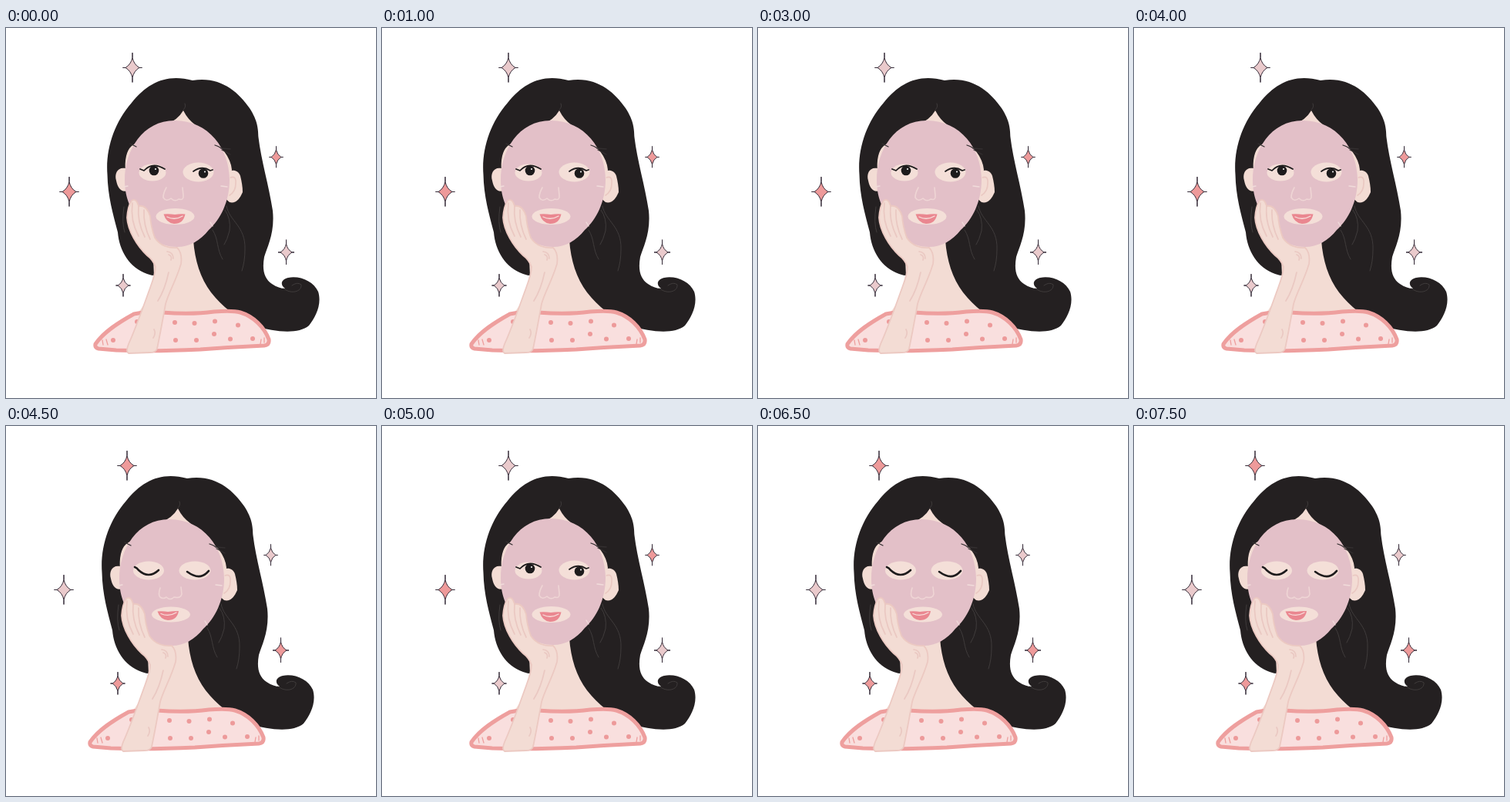
Animation of 480 by 480 pixels, one loop 8000 ms. Source, as an HTML page:

```html
<!DOCTYPE html>
<html lang="en">
<head>
<meta charset="utf-8">
<title>Face mask</title>
<style>
  html, body { margin: 0; width: 100%; height: 100%; overflow: hidden; background: #fff; }
  svg { display: block; width: 100vw; height: 100vh; }
  path { stroke-linecap: round; stroke-linejoin: round; }

  /* Two held poses, half a second each */
  .figure { animation: sway 1s step-end infinite; }
  .open { animation: first 1s step-end infinite; }
  .closed { animation: second 1s step-end infinite; }
  .pale { animation: to-coral 1s step-end infinite; }
  .coral { animation: to-pale 1s step-end infinite; }
  .face { animation: nod 1s step-end infinite; }
  @keyframes sway { 0% { transform: none; } 50% { transform: translate(-7px, 0); } }
  @keyframes nod { 0% { transform: none; } 50% { transform: translate(0, 1px); } }
  @keyframes first { 0% { visibility: visible; } 50% { visibility: hidden; } }
  @keyframes second { 0% { visibility: hidden; } 50% { visibility: visible; } }
  @keyframes to-coral { 0% { fill: #eacacc; } 50% { fill: #ee9a9a; } }
  @keyframes to-pale { 0% { fill: #ee9a9a; } 50% { fill: #eacacc; } }

  .hair { fill: #242021; }
  .skin { fill: #f3dcd4; }
  .arm { stroke: #ecc9c2; stroke-width: 1.8; }
  .mask { fill: #e3c0c8; }
  .hole { fill: #f4dfd8; }
  .dress { fill: #f9dfde; stroke: #ee9f9e; stroke-width: 5; }
  .dots { fill: #ed9a9a; }
  .lips { fill: #ea8790; }
  .ink { fill: #1d1b1c; }
  .line { fill: none; stroke-width: 1.3; }
  .crease { stroke: #eac8c2; stroke-width: 1.7; }
  .strand { stroke: #403c3c; stroke-width: 1; }
  .lash { stroke: #1d1b1c; stroke-width: 1.8; }
  .closed .lash { stroke-width: 2.6; }
  .nose { stroke: #efd5d5; stroke-width: 1.6; }
  .star { stroke: #332936; stroke-width: 1; }
</style>
</head>
<body>
<svg viewBox="0 0 480 480">
  <defs>
    <path id="star" vector-effect="non-scaling-stroke"
      d="M0-19V-13Q2-4 9 0H12.500H9Q2 4 0 13V19V13Q-2 4-9 0H-12.500H-9Q-2-4 0-13Z"/>
  </defs>
  <g class="figure">
    <g class="star">
      <use class="pale" href="#star" x="164" y="51.500"/>
      <use class="coral" href="#star" x="82" y="212.500"/>
      <g transform="translate(350.5 167.500) scale(.72)"><use class="coral" href="#star"/></g>
      <g transform="translate(363.5 291) scale(.84)"><use class="pale" href="#star"/></g>
      <g transform="translate(152 334) scale(.76)"><use class="pale" href="#star"/></g>
    </g>

    <path class="hair" d="M131.500 190C129 158 140 123 163 97C184 71 208 59 242 68
      C277 62 301 82 316 104C327 121 327 131 327.500 142C331 172 341 204 346 237
      C349 265 339 284 335 297C332 314 335 325 345 332C351 336 357 338 362 338
      C355 333 357 326 366 324C382 321 399 329 405 342C410 358 402 375 393 386
      C379 398 348 394 324 387L286 368L206 318Q196 324 183 319
      C160 311 147 289 145 265C139 242 132 218 131.500 190Z"/>
    <g class="line strand">
      <path d="M286 231C290 251 311 257 310 287Q310 303 306 315"/>
      <path d="M268 262C276 274 273 287 281 300"/>
      <path d="M153 232Q150 253 154 265"/>
      <path d="M284 236Q292 247 290 263Q287 275 283 281"/>
      <path d="M360 338C370 346 384 342 383 333Q378 329 371 334"/>
      <path d="M230 106Q234 103 232 98"/>
    </g>

    <path class="skin" d="M190 276L243 275C245 302 252 324 266 343Q277 357 291 368
      L245 376L170 371Q188 350 192 322Z"/>
    <path class="dress" d="M116 410C127 394 146 382 166 371Q183 367 202 369
      Q241 372 270 368Q294 366 304 369C321 374 335 388 341 404Q342 411 335 412
      Q292 414 252 417Q190 420 143 418L120 416Q115 415 116 410Z"/>
    <path class="line" stroke="#ee9f9e"
      d="M125 405L126 411M130 404L132 411M331 404L330 410M335 402L335 408"/>
    <g class="dots">
      <circle cx="139" cy="405" r="3"/><circle cx="170" cy="381" r="3"/>
      <circle cx="219" cy="382" r="3"/><circle cx="244.500" cy="383" r="3"/>
      <circle cx="271" cy="380.500" r="3"/><circle cx="301" cy="385.500" r="3"/>
      <circle cx="220" cy="405" r="3"/><circle cx="247" cy="405" r="3"/>
      <circle cx="270" cy="397" r="3"/><circle cx="291" cy="403.500" r="3"/>
      <circle cx="320" cy="403" r="3"/>
    </g>

    <path class="skin" d="M158 183C146 178 140 188 143 198C145 208 150 214 158 211Z"/>
    <path class="skin" d="M285 188C292 183 301 183 304 192C306 200 307 207 307 213
      C303 222 298 228 290 226L283 220Z"/>
    <path class="line crease" d="M291 194Q299 191 298 202Q298 212 290 217"/>
    <path class="skin" d="M230 107Q223 119 208 125L175 145L163 153Q153 162 155 187
      L200 250L270 245L289 200L293 184Q292 172 283 160L246 126Q236 119 230 107Z"/>

    <g class="face">
      <path class="mask" d="M154 197C154 159 177 120 219 120C263 120 290 157 290 197
        C290 225 278 249 263 262C252 276 238 284 222 284C199 284 185 272 177 254
        C163 239 154 222 154 197Z"/>
      <path class="line" stroke="#f1dcdb" d="M279 205L287 206M265 252L268 257M153 206L158 205"/>
      <path class="line" stroke="#332f30" d="M161 150L169 154M271 152Q277 154 279 156L291 157M280 158L291 164"/>
    </g>

    <g class="open">
      <ellipse class="hole" cx="190" cy="187.500" rx="17.500" ry="11"/>
      <ellipse class="hole" cx="249.500" cy="187" rx="20" ry="12.500"/>
      <ellipse class="hole" cx="219.500" cy="244.500" rx="25" ry="10.500"/>
      <circle class="ink" cx="192" cy="185" r="6.300"/>
      <circle class="ink" cx="256" cy="188.500" r="6.300"/>
      <circle cx="194" cy="183" r="1" fill="#fff"/>
      <circle cx="258" cy="186.500" r="1" fill="#fff"/>
      <path class="line lash" d="M174 183L179 185Q190 173 206 183"/>
      <path class="line lash" d="M243 186Q254 178 265 185L268 184"/>
      <path class="line nose" d="M208 207Q204 214 204 220Q208 226 214 221Q219 226 224 222Q231 224 230 217L229 207"/>
      <path class="lips" d="M204.500 241.500Q212 241 219 242Q226 241 232.500 241.500Q230 254 218 254Q208 253 204.500 241.500Z"/>
      <path class="line" stroke="#f8dfdc" d="M209 245Q219 250 229 244"/>
    </g>

    <g class="closed">
      <ellipse class="hole" cx="192" cy="187.500" rx="20" ry="12"/>
      <ellipse class="hole" cx="252" cy="187.500" rx="20.500" ry="12"/>
      <ellipse class="hole" cx="221" cy="244.500" rx="25" ry="10"/>
      <path class="line lash" d="M174 183Q177 184 179 187Q192 199 205 187"/>
      <path class="line lash" d="M242 189Q257 200 267 191L270 188"/>
      <path class="line nose" d="M207 210Q204 219 207 222Q211 225 215 222Q220 227 225 222Q234 224 235 218L234 209"/>
      <path class="lips" d="M203.500 240.500Q211 240 217 241Q224 240 231 240Q229 252 217 252Q207 251 203.500 240.500Z"/>
      <path class="line" stroke="#f8dfdc" d="M208 243.500Q218 248 228 242"/>
    </g>

    <path class="skin arm" d="M163 224Q169 220 172 231Q182 229 187 244
      Q188 258 193 272C200 283 212 286 222 285Q229 292 227 306
      C221 327 211 343 207 358Q200 397 196 416Q194 421 187 421L159 422Q155 420 159 410
      C169 388 179 359 187 337Q194 318 194 310Q191 301 183 295
      C170 283 158 263 157 246Q158 231 163 224Z"/>
    <g class="line crease">
      <path d="M164 227Q161 250 172 270"/>
      <path d="M172 231Q170 251 180 271"/>
      <path d="M179 236Q178 256 187 274"/>
      <path d="M209 290Q217 291 217 299M211 294Q216 296 214 301"/>
      <path d="M211 317Q206 340 197 354"/>
      <path d="M192 391Q195 396 191 402"/>
    </g>
  </g>
</svg>
</body>
</html>
```
